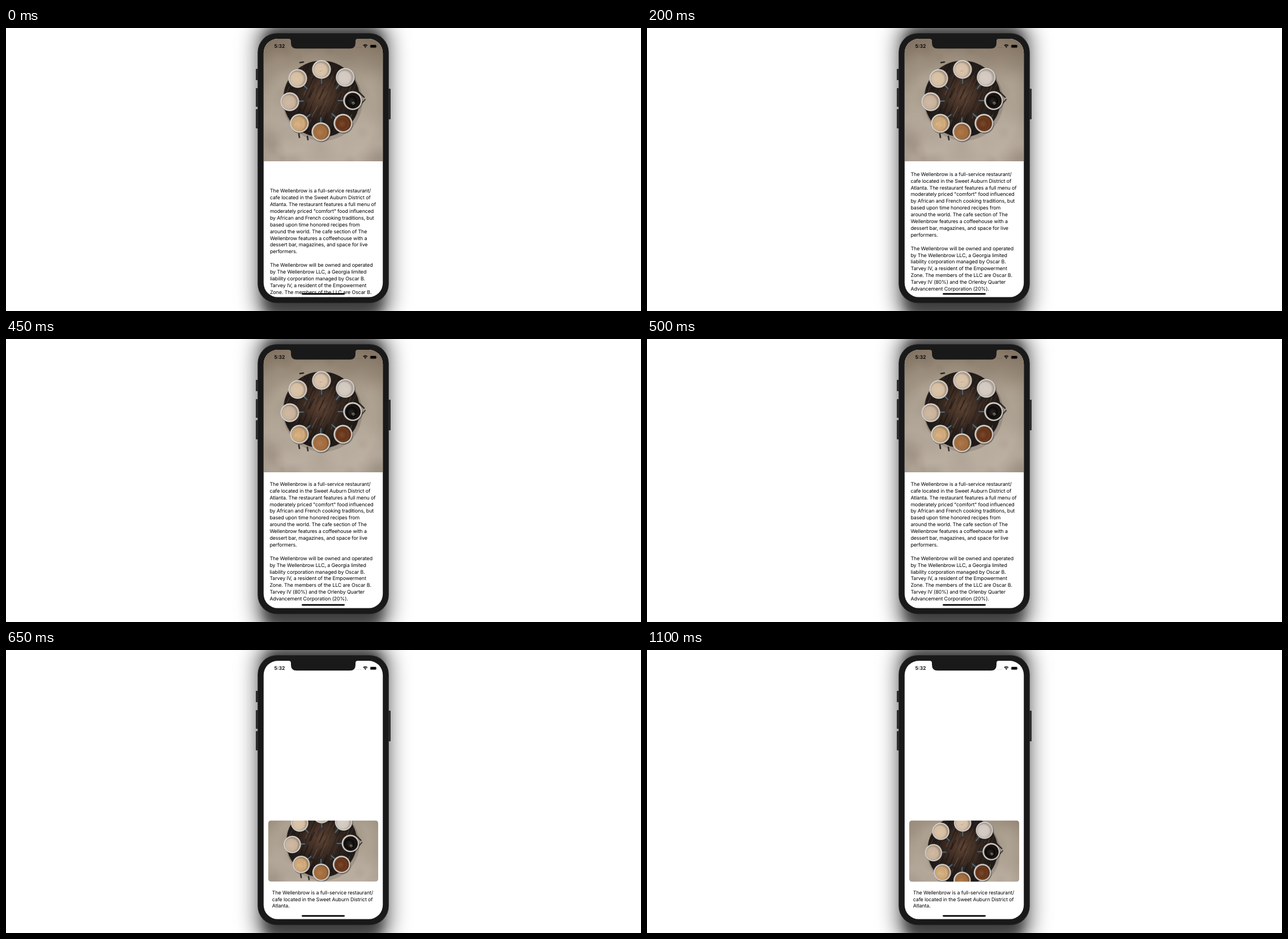
These frames come from a looping animation (1121x499 px, 1700 ms). An HTML page with a canvas:

```html
<!DOCTYPE html>
<html lang="en">
<head>
<meta charset="utf-8">
<title>Cafe card</title>
<style>
html, body { margin: 0; width: 100%; height: 100%; overflow: hidden; background: #fff; }
canvas { display: block; width: 1121px; height: 499px; }
</style>
</head>
<body>
<canvas id="stage"></canvas>
<script>
const W = 1121, H = 499, LOOP = 1700, STEP = 50, SWITCH = 550;
const dpr = window.devicePixelRatio || 1;
const INK = '#191919';
const FONT = 'Inter, "Liberation Sans", sans-serif';
const PITCH = 11.9;

const STORY = [
  'The Wellenbrow is a full-service restaurant/',
  'cafe located in the Sweet Auburn District of',
  'Atlanta. The restaurant features a full menu of',
  'moderately priced "comfort" food influenced',
  'by African and French cooking traditions, but',
  'based upon time honored recipes from',
  'around the world. The cafe section of The',
  'Wellenbrow features a coffeehouse with a',
  'dessert bar, magazines, and space for live',
  'performers.',
  '',
  'The Wellenbrow will be owned and operated',
  'by The Wellenbrow LLC, a Georgia limited',
  'liability corporation managed by Oscar B.',
  'Tarvey IV, a resident of the Empowerment',
  'Zone. The members of the LLC are Oscar B.',
  'Tarvey IV (80%) and the Orlenby Quarter',
  'Advancement Corporation (20%).'
];
const SUMMARY = [STORY[0], STORY[1], 'Atlanta.'];

function layer(w, h, scale, paint) {
  const c = document.createElement('canvas');
  c.width = Math.round(w * scale);
  c.height = Math.round(h * scale);
  const g = c.getContext('2d');
  g.scale(scale, scale);
  paint(g);
  return c;
}

function box(g, x, y, w, h, r, fill) {
  g.beginPath();
  g.roundRect(x, y, w, h, r);
  if (fill) { g.fillStyle = fill; g.fill(); }
}

function disc(g, x, y, r, fill) {
  g.beginPath();
  g.arc(x, y, r, 0, Math.PI * 2);
  g.fillStyle = fill;
  g.fill();
}

function line(g, x1, y1, x2, y2, width, color) {
  g.beginPath();
  g.moveTo(x1, y1);
  g.lineTo(x2, y2);
  g.lineWidth = width;
  g.strokeStyle = color;
  g.stroke();
}

function gradient(g, x, y, r, stops) {
  const f = g.createRadialGradient(x, y, 0, x, y, r);
  stops.forEach(([at, color]) => f.addColorStop(at, color));
  return f;
}

function seeded(seed) {
  return () => (seed = (seed * 16807) % 2147483647) / 2147483647;
}

// Photo space is centred on the middle of the portrait picture.
const PW = 211, PH = 316;
// x, y, coffee colour, handle direction in degrees
const CUPS = [
  [-3, -54, '#d6c0a8', 87], [39, -40, '#d2c9c2', 127],
  [52, 1, '#0b0908', 180], [35, 41, '#653317', 222],
  [-4, 56, '#a26b3c', 272], [-42, 41, '#cda677', 322],
  [-59, 3, '#c9b39d', 357], [-45, -38, '#d6bfa3', 46]
];

function paintTable(g, rnd) {
  disc(g, -1, 2, 70, 'rgba(70,58,48,.2)');
  g.lineCap = 'round';
  line(g, -41, -66, -35, -67, 2.5, '#282522');
  line(g, 63, -14, 72, -5, 2.5, '#282522');
  line(g, 66, 8, 74, -1, 2, '#34312e');
  line(g, -43, 60, -42, 66, 2.5, '#282522');
  line(g, -28, 64, -27, 70, 2.5, '#282522');
  g.beginPath();
  g.arc(-2, 0, 69, .4, 1.3);
  g.lineWidth = 1;
  g.strokeStyle = '#a39b92';
  g.stroke();

  g.save();
  g.beginPath();
  g.arc(-3, -2, 67.5, 0, Math.PI * 2);
  g.clip();
  g.fillStyle = gradient(g, -4, -8, 68, [[0, '#5e4434'], [.35, '#433026'], [.65, '#2b211c'], [1, '#201b19']]);
  g.fillRect(-75, -75, 150, 150);
  g.rotate(.42);
  g.lineCap = 'butt';
  for (let i = 0; i < 200; i++) {
    const x = (rnd() - .5) * 145, y = (rnd() - .5) * 140, len = 6 + rnd() * 26;
    const tone = rnd() < .55 ? '18,14,12' : rnd() < .65 ? '110,78,56' : '146,120,100';
    line(g, x, y, x + 2 * (rnd() - .5), y + len, .5 + rnd() * 1.6, `rgba(${tone},${.15 + rnd() * .4})`);
  }
  for (let x = -66; x < 70; x += 17) line(g, x, -72, x, 72, .8, 'rgba(13,10,9,.5)');
  g.restore();
}

function paintCup(g, [x, y, coffee, deg]) {
  const a = deg * Math.PI / 180, cx = Math.cos(a), cy = Math.sin(a);
  disc(g, x + 1, y + 1.5, 16.8, 'rgba(12,9,8,.4)');
  g.lineCap = 'round';
  line(g, x + cx * 15, y + cy * 15, x + cx * 26, y + cy * 26, 4.5, '#2b2f31');
  line(g, x + cx * 15 - 1, y + cy * 15, x + cx * 25 - 1, y + cy * 25, 1.6, '#66757b');
  disc(g, x, y, 16.8, '#9d9a97');
  disc(g, x - .2, y - .2, 16.2, '#d8d4cf');
  disc(g, x, y, 14.4, '#a0958a');
  disc(g, x + .2, y + .3, 13.8, coffee);
  disc(g, x, y, 13.8, gradient(g, x - 2, y + 1, 14,
    [[0, 'rgba(255,235,210,.13)'], [.65, 'rgba(255,235,210,0)'], [1, 'rgba(45,24,10,.24)']]));
}

function paintPhoto(g) {
  const rnd = seeded(73);
  g.translate(PW / 2, PH / 2);
  const wall = g.createLinearGradient(0, -158, 0, 158);
  [[0, '#827364'], [.2, '#978876'], [.42, '#aca090'], [.78, '#baaea1'], [1, '#aaa092']]
    .forEach(([at, c]) => wall.addColorStop(at, c));
  g.fillStyle = wall;
  g.fillRect(-106, -158, 212, 316);
  for (let i = 0; i < 75; i++) {
    const x = (rnd() - .5) * PW, y = (rnd() - .5) * PH, r = 8 + rnd() * 27;
    const tone = rnd() < .5 ? '218,207,193' : '105,91,77';
    disc(g, x, y, r, gradient(g, x, y, r, [[0, `rgba(${tone},.1)`], [1, `rgba(${tone},0)`]]));
  }
  g.fillStyle = gradient(g, 0, 20, 185, [[0, 'rgba(70,55,42,0)'], [.5, 'rgba(70,55,42,0)'], [1, 'rgba(70,55,42,.34)']]);
  g.fillRect(-106, -158, 212, 316);
  g.beginPath();
  g.ellipse(-43, 149, 5, 2.4, .1, 0, Math.PI * 2);
  g.fillStyle = 'rgba(66,43,29,.8)';
  g.fill();

  paintTable(g, rnd);
  CUPS.forEach(cup => paintCup(g, cup));

  // Highlights on the surface of the coffee
  for (let i = 0; i < 5; i++) disc(g, 50 + rnd() * 6, 2 + rnd() * 6, 1.3, 'rgba(150,147,137,.55)');
  for (let i = 0; i < 14; i++) {
    const x = -50 + rnd() * 16, y = 34 + rnd() * 13;
    line(g, x, y, x + 3 * (rnd() - .5), y + 3, .8, 'rgba(235,205,156,.5)');
  }
  disc(g, -5, -51, 1, '#b99a7c');
  disc(g, -2, -52, .8, '#b99a7c');
}

function shadow(g, x, y, w, h, r, blur, alpha) {
  const far = 2000;
  g.save();
  g.shadowColor = `rgba(0,0,0,${alpha})`;
  g.shadowBlur = blur * dpr;
  g.shadowOffsetX = far * dpr;
  box(g, x - far, y, w, h, r, '#000');
  g.restore();
}

function paintPhone(g) {
  g.fillStyle = '#fff';
  g.fillRect(0, 0, W, H);
  shadow(g, 443, -10, 234, 525, 34, 36, .6);
  shadow(g, 456, -2, 208, 514, 24, 18, .42);
  [[441, 72, 20], [441, 106, 33], [441, 143, 34], [674.5, 107, 54]]
    .forEach(([x, y, h]) => box(g, x, y, 4.5, h, 1, '#2d2d2e'));
  box(g, 444.2, 9, 231.6, 476.2, 34, '#2a2a2b');
  box(g, 445.2, 10, 229.6, 474.2, 33, INK);
}

function paintNotch(g) {
  g.beginPath();
  g.moveTo(499, 18);
  g.lineTo(499, 19);
  g.quadraticCurveTo(503, 19, 503, 23);
  g.lineTo(503, 26);
  g.quadraticCurveTo(503, 36.3, 513, 36.3);
  g.lineTo(607, 36.3);
  g.quadraticCurveTo(617, 36.3, 617, 26);
  g.lineTo(617, 23);
  g.quadraticCurveTo(617, 19, 621, 19);
  g.lineTo(621, 18);
  g.fillStyle = INK;
  g.fill();
}

function text(g, str, x, y, size, weight = 400, spacing = -.1) {
  g.font = `${weight} ${size}px ${FONT}`;
  g.letterSpacing = spacing + 'px';
  g.textRendering = 'geometricPrecision';
  g.fillStyle = '#000';
  g.fillText(str, x, y);
}

function paragraph(g, lines, x, y) {
  lines.forEach((str, i) => text(g, str, x, y + i * PITCH, 8.85));
}

function paintStatus(g) {
  text(g, '5:32', 473.5, 35.2, 8.7, 600, 0);
  for (let i = 0; i < 4; i++) disc(g, 619 + i * 2.6, 34.4, .6, 'rgba(0,0,0,.25)');
  g.lineCap = 'butt';
  [4.9, 2.9].forEach(r => {
    g.beginPath();
    g.arc(634.3, 34.3, r, -Math.PI * .77, -Math.PI * .23);
    g.lineWidth = 1.3;
    g.strokeStyle = '#000';
    g.stroke();
  });
  g.beginPath();
  g.moveTo(634.3, 35.2);
  g.arc(634.3, 34.3, 1.5, -Math.PI * .8, -Math.PI * .2);
  g.fillStyle = '#000';
  g.fill();
  box(g, 642.6, 29.4, 11.4, 5.7, 1.7);
  g.lineWidth = .5;
  g.strokeStyle = 'rgba(0,0,0,.45)';
  g.stroke();
  box(g, 643.3, 30, 10, 4.5, 1.1, '#000');
  box(g, 654.6, 31.3, .7, 2, .4, 'rgba(0,0,0,.5)');
}

const canvas = document.getElementById('stage');
canvas.width = Math.round(W * dpr);
canvas.height = Math.round(H * dpr);
const ctx = canvas.getContext('2d');
const phone = layer(W, H, dpr, paintPhone);
const photo = layer(PW, PH, 2 * dpr, paintPhoto);

function placePhoto(x, y, w, h, r, cx, cy, scale) {
  ctx.save();
  box(ctx, x, y, w, h, r);
  ctx.clip();
  ctx.imageSmoothingQuality = 'high';
  ctx.drawImage(photo, cx - PW * scale / 2, cy - PH * scale / 2, PW * scale, PH * scale);
  ctx.restore();
}

function paintDetail(t) {
  const rest = Math.exp(-t / 72);
  placePhoto(454.5, 19, 211, 216, 0, 560, 127, 1);
  paragraph(ctx, STORY, 465.4 + .5 * rest, 258.8 + 31.4 * rest);
}

function paintCard(t) {
  const rest = Math.exp(-(t - SWITCH) / 52);
  placePhoto(463, 300.8, 194, 107.7 - 1.2 * rest, 4.5, 560, 354.7 - 99 * rest, .919 + .041 * rest);
  paragraph(ctx, SUMMARY, 469.8, 430.6);
}

function draw(t) {
  ctx.setTransform(1, 0, 0, 1, 0, 0);
  ctx.drawImage(phone, 0, 0);
  ctx.scale(dpr, dpr);
  ctx.save();
  box(ctx, 454.8, 19, 210.4, 455.6, 25, '#fff');
  ctx.clip();
  if (t < SWITCH) paintDetail(t);
  else paintCard(t);
  paintNotch(ctx);
  paintStatus(ctx);
  box(ctx, 522, 467.4, 76, 2.9, 1.45, '#000');
  ctx.restore();
}

const start = performance.now();
function tick() {
  const t = (performance.now() - start) % LOOP;
  draw(Math.floor(t / STEP) * STEP);
  requestAnimationFrame(tick);
}
tick();
</script>
</body>
</html>
```
